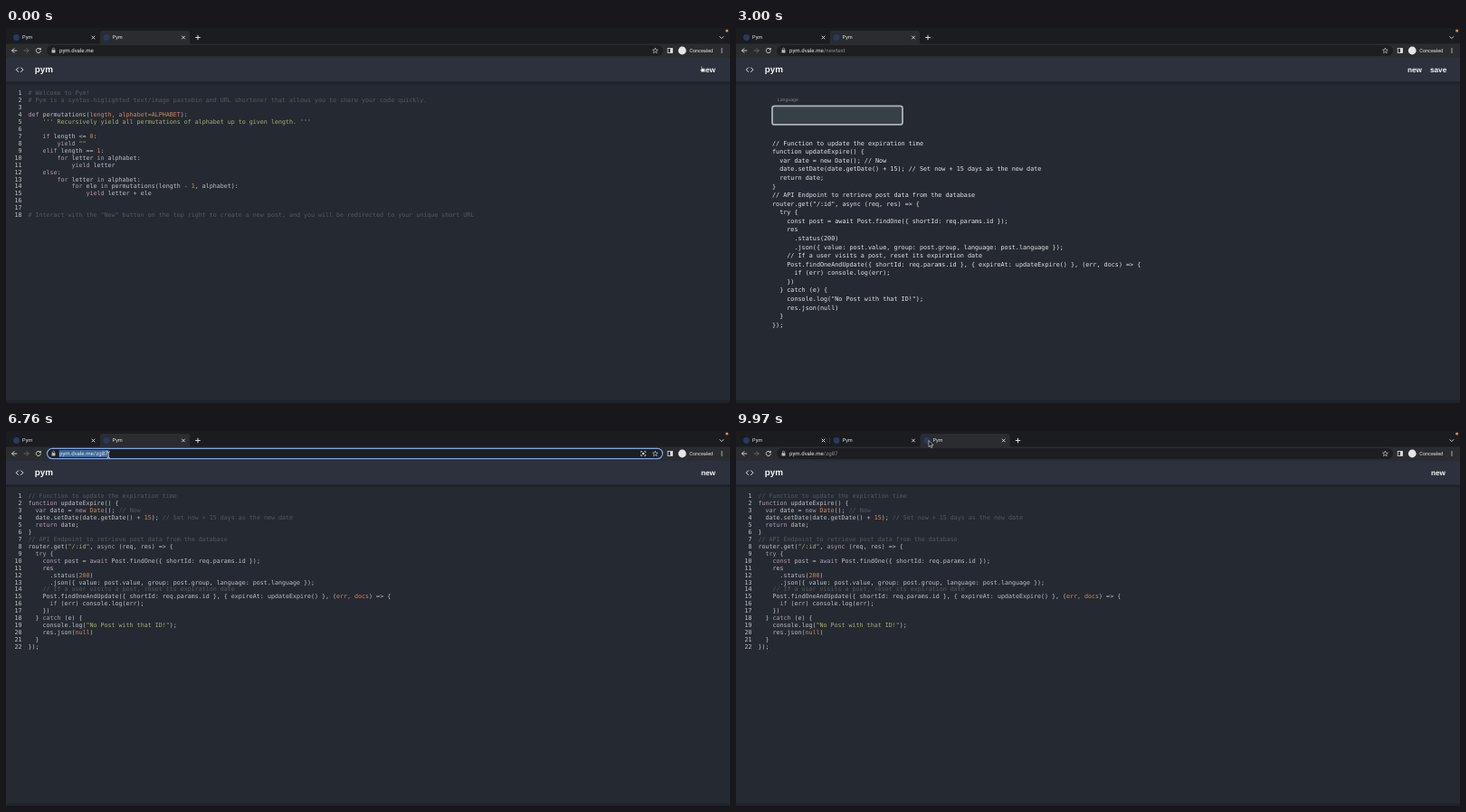
An HTML page that plays this animation: 800x415 px, repeating every 10 s.

```html
<!DOCTYPE html>
<html lang="en">
<head>
<meta charset="utf-8">
<title>pym</title>
<style>
  html, body { margin: 0; width: 100%; height: 100%; overflow: hidden; background: #252931; }
  svg { display: block; width: 100vw; height: 100vh; }
  text { white-space: pre; text-rendering: geometricPrecision; }
  .ui { font-family: Roboto, sans-serif; }
  .app { font-family: "Liberation Sans", Arial, sans-serif; }
  .mono { font-family: "DejaVu Sans Mono", monospace; }
  .line { fill: none; stroke-linecap: round; stroke-linejoin: round; }
</style>
</head>
<body>
<svg id="stage" viewBox="0 0 800 415" preserveAspectRatio="none">
  <defs>
    <linearGradient id="shade" x2="0" y2="1">
      <stop stop-color="#15181d" stop-opacity=".6"/>
      <stop offset="1" stop-color="#15181d" stop-opacity="0"/>
    </linearGradient>
  </defs>
</svg>
<script>
const LOOP = 10000;
const NEW_PAGE = 430, PASTE = 1400, FOCUS = 2400, BLUR = 4850, SAVED = 5430, LOADED = 5790;
const SELECT = 6600, NEW_TAB = 8200, ENTER = 9080, OPENED = 9560, SHOWN = 9650;

const stage = document.getElementById('stage');
const timed = [];

function add(parent, tag, attrs = {}, content) {
  const node = document.createElementNS('http://www.w3.org/2000/svg', tag);
  for (const key in attrs) node.setAttribute(key, attrs[key]);
  if (content !== undefined) node.textContent = content;
  return parent.appendChild(node);
}
const rect = (p, x, y, width, height, fill, more) => add(p, 'rect', { x, y, width, height, fill, ...more });
const disc = (p, cx, cy, r, fill) => add(p, 'circle', { cx, cy, r, fill });
const line = (p, d, stroke, width = .9) => add(p, 'path', { d, stroke, 'stroke-width': width, class: 'line' });
const label = (p, x, y, size, fill, content, more) =>
  add(p, 'text', { x, y, 'font-size': size, fill, class: 'ui', ...more }, content);

// A group visible only inside the given [from, to] spans.
function during(parent, ...spans) {
  const node = add(parent, 'g');
  timed.push({ node, spans });
  return node;
}

// ---------- code ----------
const TOKENS = /((?:#|\/\/).*)|('''.*'''|"[^"]*")|\b(\d+|Date(?=\(\);)|null|err, docs|length, alphabet=ALPHABET)\b|\b(def|if|elif|else|for|in|yield|function|var|new|return|const|await|async|try|catch)\b/g;
const TOKEN_COLORS = [, '#555960', '#a9b070', '#cf8a60', '#b09db6'];

const pythonCode = `# Welcome to Pym!
# Pym is a syntax-higlighted text/image pastebin and URL shortener that allows you to share your code quickly.

def permutations(length, alphabet=ALPHABET):
    ''' Recursively yield all permutations of alphabet up to given length. '''

    if length <= 0:
        yield ""
    elif length == 1:
        for letter in alphabet:
            yield letter
    else:
        for letter in alphabet:
            for ele in permutations(length - 1, alphabet):
                yield letter + ele


# Interact with the "New" button on the top right to create a new post, and you will be redirected to your unique short URL`;

const scriptCode = `// Function to update the expiration time
function updateExpire() {
  var date = new Date(); // Now
  date.setDate(date.getDate() + 15); // Set now + 15 days as the new date
  return date;
}
// API Endpoint to retrieve post data from the database
router.get("/:id", async (req, res) => {
  try {
    const post = await Post.findOne({ shortId: req.params.id });
    res
      .status(200)
      .json({ value: post.value, group: post.group, language: post.language });
    // If a user visits a post, reset its expiration date
    Post.findOneAndUpdate({ shortId: req.params.id }, { expireAt: updateExpire() }, (err, docs) => {
      if (err) console.log(err);
    })
  } catch (e) {
    console.log("No Post with that ID!");
    res.json(null)
  }
});`;

function highlight(text, source) {
  let last = 0;
  for (const match of source.matchAll(TOKENS)) {
    add(text, 'tspan', {}, source.slice(last, match.index));
    const kind = match.findIndex((part, i) => i && part !== undefined);
    add(text, 'tspan', { fill: TOKEN_COLORS[kind] }, match[0]);
    last = match.index + match[0].length;
  }
  add(text, 'tspan', {}, source.slice(last));
}

function viewer(parent, code) {
  code.split('\n').forEach((source, i) => {
    const y = 74.4 + i * 7.93, mono = { class: 'mono' };
    label(parent, 17.6, y, 6.66, '#c6c8cb', i + 1, { ...mono, 'text-anchor': 'end' });
    highlight(label(parent, 24.4, y, 6.66, '#bfc2c5', '', mono), source);
  });
}

// ---------- app page ----------
rect(stage, 0, 0, 800, 415, '#252931');
rect(stage, 0, 412, 800, 3, '#1f2229');
rect(stage, 0, 32.5, 800, 27, '#2c313d');
rect(stage, 0, 59.5, 800, 4, 'url(#shade)');
line(stage, 'M13.6 43.9l-2.3 2.3 2.3 2.3M16.6 43.9l2.3 2.3-2.3 2.3', '#e6e8ea', 1);
const bold = { class: 'app', 'font-weight': 700 };
label(stage, 31.8, 48.8, 9.8, '#f3f4f5', 'pym', bold);

const editor = during(stage, [NEW_PAGE, SAVED]);
label(editor, 742, 48.7, 8.2, '#f3f4f5', 'new', bold);
label(editor, 767, 48.7, 8.2, '#f3f4f5', 'save', bold);
const single = during(stage, [0, NEW_PAGE], [SAVED, LOOP]);
label(single, 768, 48.7, 8.2, '#f3f4f5', 'new', bold);

viewer(during(stage, [0, NEW_PAGE]), pythonCode);
viewer(during(stage, [LOADED, NEW_TAB], [SHOWN, LOOP]), scriptCode);

const pasted = during(editor, [PASTE, SAVED]);
scriptCode.split('\n').forEach((source, i) =>
  label(pasted, 40, 129.7 + i * 9.57, 6.77, '#e4e6e8', source, { class: 'mono' }));
const caret = rect(editor, 52.3, 324, .6, 8, '#e4e6e8');

label(editor, 45.8, 81, 5.2, '#7d8188', 'Language', { class: 'app' });
rect(editor, 40, 86.3, 144, 20.6, '#384047', { rx: 2.5, stroke: '#6b7279', 'stroke-width': .8 });
rect(during(editor, [FOCUS, BLUR]), 40, 86.3, 144, 20.6, 'none', { rx: 2.5, stroke: '#a9b0b7', 'stroke-width': 1.8 });
const language = label(editor, 111.2, 99, 6.8, '#eceef0', '', { class: 'app', 'text-anchor': 'middle' });

const typing = [[0, 'python'], [2950, ''], [3150, 'j'], [3350, 'ja'], [3820, 'jav'], [3960, 'java'],
  [4090, 'javas'], [4200, 'javasc'], [4300, 'javascr'], [4390, 'javascri'], [4470, 'javascrip'], [4550, 'javascript']];

function dropdown(from, to, options) {
  const list = during(editor, [from, to]);
  rect(list, 40, 107.6, 144, 7 + 15 * options.length, '#fff');
  rect(list, 40, 111, 144, 15, '#dadbdc');
  options.forEach((name, i) => label(list, 46.8, 120.6 + i * 15, 6.75, '#17181a', name, { class: 'app' }));
}
dropdown(FOCUS + 60, 2950, ['python']);
dropdown(3150, 3350, ['javascript', 'json', 'julia']);
dropdown(3350, 4640, ['javascript']);

// ---------- private start page ----------
const start = during(stage, [NEW_TAB, OPENED]);
rect(start, 0, 32, 800, 383, '#2b2c30');
rect(start, 0, 45.7, 800, .6, '#3b3c40');
const bookmarks = [
  [9.5, 'Plomby Docs', '#4285f4', 1], [56.8, 'Plomby Drive', '#d8ab32'], [103.6, 'Mails', '#dd5044'],
  [134, 'Plomby Calender', '#4285f4', 1], [190.8, 'Elm Valley Home', '#203b68'], [251, 'Tornipe', '#dce9f1', 1],
  [288.8, 'Velmo', '#27345f'], [318.5, 'Lucky Numeral St...', '#a8abb0'], [380, 'Zindo Stocks', '#7623d3', 1],
  [429, 'Quillmoss', '#26701f'], [470.8, 'Larno - Elm Vall...', '#8c43df'], [535.4, 'Drape Top 75 Ques...', '#b7653e'],
  [598.6, 'Tinker Post', '#f56a20', 1], [646.3, 'hostplumb', '#ef6035', 1], [690.4, 'murvex', '#397bbd']
];
for (const [x, name, color, square] of bookmarks) {
  if (square) rect(start, x - 3, 36, 6, 6, color, { rx: .6 });
  else disc(start, x, 39, 3, color);
  label(start, x + 6.4, 40.9, 5.4, '#dfe1e4', name);
}
disc(start, 400, 101, 25, '#d3d5d9');
label(start, 400, 145.5, 9.25, '#dfe1e4', 'You’ve gone Concealed', { 'text-anchor': 'middle' });

const note = (x, y, content, fill = '#bbbec3') => label(start, x, y, 5.8, fill, content);
note(275, 165.2, 'Now you can browse privately, and other people who use this device won’t see your activity.');
const closing = note(275, 173.5, 'However, downloads, bookmarks and reading list items will be saved. ');
add(closing, 'tspan', { fill: '#83aef0' }, 'Learn more');

function facts(x, before, strong, after, items) {
  const heading = note(x, 191.8, before);
  add(heading, 'tspan', { fill: '#e6e8eb' }, strong);
  add(heading, 'tspan', {}, after);
  items.forEach((item, i) => {
    disc(start, x + 2.4, 199.8 + i * 8.4, .8, '#bbbec3');
    note(x + 6.6, 201.8 + i * 8.4, item);
  });
}
facts(275, 'Brulen ', 'won’t save', ' the following information:',
  ['Your browsing history', 'Cookies and site data', 'Information entered in forms']);
facts(406.4, 'Your activity ', 'might still be visible', ' to:',
  ['Websites you visit', 'Your employer or school', 'Your internet service provider']);

rect(start, 275, 230.5, 250, 35, '#35363a', { rx: 3 });
note(283.3, 241.8, 'Block third-party cookies', '#e0e2e5');
note(283.3, 250.1, 'When on, sites can’t use cookies that track you across the web. Features on some');
note(283.3, 258.4, 'sites may break.');
rect(start, 504, 245.6, 12, 4.8, '#50699b', { rx: 2.4 });
disc(start, 513.5, 248, 3.3, '#83aef0');

// ---------- browser frame ----------
const ICON = '#dcdee1', DIM = '#66696e';
rect(stage, 0, 0, 800, 18, '#1b1c1f');
rect(stage, 0, 17.5, 800, 15, '#2b2c30');
disc(stage, 796.6, 3, 1.6, '#dd8c35');
line(stage, 'M788.8 9.6l2 2 2-2', ICON);

const activeTab = x => `M${x - 2} 18q2 0 2-3V6q0-3 3-3h93q3 0 3 3v9q0 3 2 3z`;
const two = during(stage, [0, NEW_TAB]), three = during(stage, [NEW_TAB, LOOP]);
add(two, 'path', { d: activeTab(104), fill: '#2b2c30' });
add(three, 'path', { d: activeTab(203.5), fill: '#2b2c30' });
rect(three, 103, 7, .5, 7, '#505257');

const cross = (p, x, y, r) => line(p, `M${x - r} ${y - r}l${2 * r} ${2 * r}m0 ${-2 * r}l${-2 * r} ${2 * r}`, ICON);
const plus = (p, x) => line(p, `M${x - 2.3} 10.5h4.6m-2.3-2.3v4.6`, ICON, 1);
function tab(p, x, title) {
  if (title === 'Pym') disc(p, x, 10.5, 3.4, '#263a60');
  label(p, x + 6.6, 12.4, 5.6, '#e0e2e5', title);
}
tab(stage, 11.5, 'Pym');
tab(stage, 111, 'Pym');
cross(stage, 96.5, 10.5, 1.5);
cross(stage, 196, 10.5, 1.5);
disc(during(stage, [7840, NEW_TAB]), 212, 10.5, 6.3, '#54565b');
plus(two, 212);
plus(three, 311.5);
cross(three, 295.7, 10.5, 1.5);
tab(during(stage, [NEW_TAB, OPENED]), 210.8, 'New Tab');
tab(during(stage, [OPENED, LOOP]), 210.8, 'Pym');

const back = 'M11.8 25H6.6m2.4-2.4L6.6 25l2.4 2.4';
line(during(stage, [0, NEW_TAB], [OPENED, LOOP]), back, ICON);
line(during(stage, [NEW_TAB, OPENED]), back, DIM);
line(stage, 'M20 25h5.2m-2.4-2.4l2.4 2.4-2.4 2.4', DIM);
const reload = during(stage, [0, ENTER], [OPENED, LOOP]);
line(reload, 'M37.9 23.3a2.6 2.6 0 1 0 .5 2.4', ICON);
add(reload, 'path', { d: 'M38.7 21.8v2.5h-2.5z', fill: ICON });
cross(during(stage, [ENTER, OPENED]), 36, 25, 2);

rect(stage, 45, 19, 681, 12, '#1d1e21', { rx: 6 });
rect(during(stage, [SELECT, ENTER]), 45.5, 19.3, 680, 11.4, 'none', { rx: 5.7, stroke: '#79a5ea', 'stroke-width': 1.2 });
const secure = during(stage, [0, NEW_TAB], [OPENED, LOOP]);
rect(secure, 50.5, 24.3, 4, 3.2, '#b8bbc0', { rx: .4 });
line(secure, 'M51.4 24.2v-.9a1.1 1.1 0 0 1 2.2 0v.9', '#b8bbc0', .7);
const info = during(stage, [NEW_TAB, OPENED]);
add(info, 'circle', { cx: 52.5, cy: 25, r: 2.5, fill: 'none', stroke: '#b8bbc0', 'stroke-width': .6 });
line(info, 'M52.5 25v1.2m0-2.5v.05', '#b8bbc0', .6);

function address(path, pathColor, ...spans) {
  const url = label(during(stage, ...spans), 59, 27.1, 6.1, '#e6e8eb', 'pym.dvale.me');
  add(url, 'tspan', { fill: pathColor }, path);
}
rect(during(stage, [SELECT, NEW_TAB]), 58.7, 21, 54.8, 8, '#3f6593');
address('', '', [0, NEW_PAGE]);
address('/newtext', '#898c92', [NEW_PAGE, SAVED]);
address('/zg87', '#898c92', [SAVED, SELECT], [ENTER, LOOP]);
address('/zg87', '#e6e8eb', [SELECT, NEW_TAB], [9000, ENTER]);

const share = during(stage, [SELECT, NEW_TAB]);
line(share, 'M701.7 23.7v-1.2h1.2m2.6 0h1.2v1.2m0 2.6v1.2h-1.2m-2.6 0h-1.2v-1.2', ICON, .7);
rect(share, 703.1, 23.9, 2.2, 2.2, ICON);

add(stage, 'path', { d: 'M717.4 22.1l.8 2 2.1.1-1.6 1.4.5 2.1-1.8-1.2-1.8 1.2.5-2.1-1.6-1.4 2.1-.1z',
  fill: 'none', stroke: ICON, 'stroke-width': .6 });
rect(stage, 731.2, 22.5, 5.2, 5, 'none', { stroke: ICON, 'stroke-width': .8 });
rect(stage, 734, 22.5, 2.4, 5, ICON);
disc(stage, 747.2, 25, 4.4, '#e4e6e9');
label(stage, 755.3, 27, 5.5, '#e4e6e9', 'Concealed');
for (const y of [23, 25, 27]) disc(stage, 791, y, .65, ICON);

// ---------- pointer ----------
const pointer = add(stage, 'g');
const shapes = { arrow: add(pointer, 'g'), hand: add(pointer, 'g'), beam: add(pointer, 'g') };
add(shapes.arrow, 'path', { d: 'M0-1.5v7l1.6-1.5 1.1 2.5 1.2-.5-1.1-2.4h2.2z', fill: '#111', stroke: '#f2f2f2', 'stroke-width': .6 });
add(shapes.hand, 'path', {
  d: 'M-.8-2.4q.7-.7 1.2 0v2.1l2.3.5q.7.2.6 1L2.8 3.8H-.2L-2.2 1.3q0-.9 1.4-.1z',
  fill: '#f6f6f6', stroke: '#17191d', 'stroke-width': .5
});
line(shapes.beam, 'M-1.3-3.5q1.3 0 1.3.8v5.4q0 .8-1.3.8M1.3-3.5q-1.3 0-1.3.8m0 5.4q0 .8 1.3.8', '#d5d7da', .8);

// time, x, y, shape from then on
const path = [
  [0, 769, 45, 'hand'], [250, 774, 47, 'hand'], [480, 774, 47, 'arrow'], [900, 260, 150, 'beam'],
  [1150, 142, 136, 'beam'], [1600, 140, 134, 'beam'], [1850, 136, 123, 'beam'], [2250, 114, 99, 'beam'],
  [2900, 114, 99, ''], [4600, 114, 99, 'beam'], [4820, 286, 88, 'arrow'], [5150, 775, 48, 'hand'],
  [5740, 778, 50, 'hand'], [5860, 718, 100, 'arrow'], [6080, 480, 195, 'arrow'], [6430, 112, 26, 'beam'],
  [7350, 116, 27, 'arrow'], [7900, 213, 12, 'arrow'], [LOOP, 213, 12, 'arrow']
];

const latest = (steps, t) => steps.findLastIndex(step => step[0] <= t);

function movePointer(t) {
  const i = latest(path, t), [from, x, y, shape] = path[i];
  const [to, nextX, nextY] = path[i + 1];
  const k = (t - from) / (to - from), ease = k * k * (3 - 2 * k);
  pointer.setAttribute('transform', `translate(${x + (nextX - x) * ease} ${y + (nextY - y) * ease})`);
  for (const name in shapes) shapes[name].style.display = name === shape ? '' : 'none';
}

function draw(now) {
  const t = now % LOOP;
  for (const { node, spans } of timed)
    node.style.display = spans.some(([from, to]) => t >= from && t < to) ? '' : 'none';
  language.textContent = typing[latest(typing, t)][1];
  caret.style.display = t >= PASTE && t < FOCUS && (t - PASTE) % 1000 < 500 ? '' : 'none';
  movePointer(t);
}

const began = performance.now();
function tick() {
  draw(performance.now() - began);
  requestAnimationFrame(tick);
}
tick();
</script>
</body>
</html>
```
